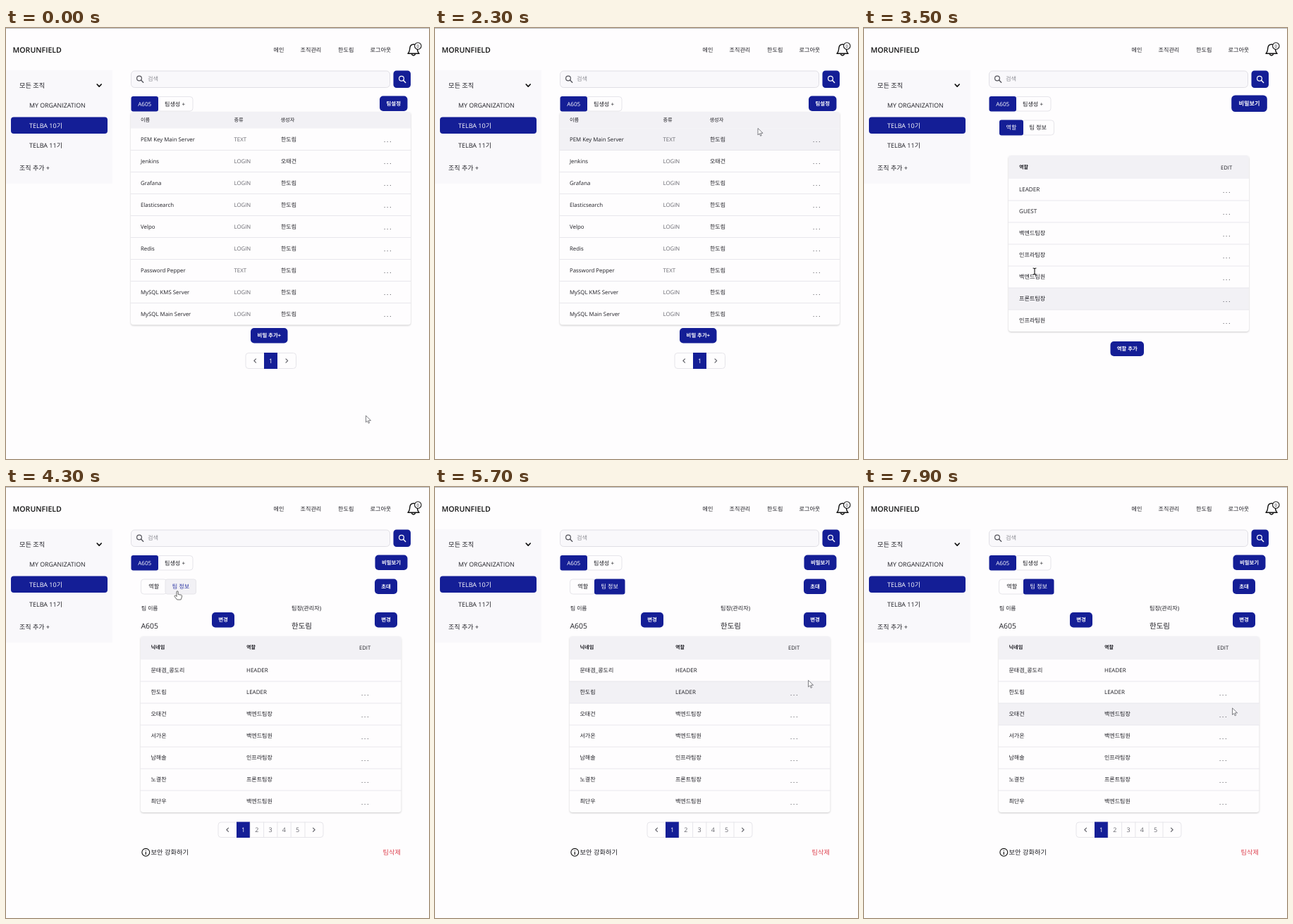
An HTML page for the animation above (8000 ms loop, 600 by 612 pixels).

```html
<!DOCTYPE html>
<html lang="ko">
<head>
<meta charset="utf-8">
<title>Team vault</title>
<style>
  html, body { margin: 0; width: 100%; height: 100%; overflow: hidden; background: #fefdfe; }
  svg { display: block; width: 100vw; height: 100vh; }
  text {
    font-family: "Open Sans", "Noto Sans CJK KR", "Noto Sans CJK", sans-serif;
    text-rendering: geometricPrecision;
    white-space: pre;
  }
  .card { filter: drop-shadow(0 1px 1.2px rgba(0, 0, 0, .2)); }
</style>
</head>
<body>
<svg id="stage" viewBox="0 0 600 612" xmlns="http://www.w3.org/2000/svg"></svg>
<script>
const BLUE = '#141e96', INK = '#1e1e24', GRAY = '#66666d', SOFT = '#f2f1f5', LINE = '#e6e5ea', PAGE = '#fefdfe';
const OWNER = '한도림';

// Text is placed by its left (or middle) x and its vertical centre.
function label(x, cy, str, size = 8, { fill = INK, weight = 500, mid = false, gap = 0 } = {}) {
  return `<text x="${x}" y="${cy + size * .36}" font-size="${size}" font-weight="${weight}" fill="${fill}"` +
    `${mid ? ' text-anchor="middle"' : ''}${gap ? ` letter-spacing="${gap}"` : ''}>${str}</text>`;
}

function box(x1, y1, x2, y2, fill, r = 0, stroke = 'none') {
  return `<rect x="${x1}" y="${y1}" width="${x2 - x1}" height="${y2 - y1}" rx="${r}" fill="${fill}" stroke="${stroke}"/>`;
}

function path(d, stroke = INK, width = 1.2, fill = 'none') {
  return `<path d="${d}" fill="${fill}" stroke="${stroke}" stroke-width="${width}" stroke-linecap="round" stroke-linejoin="round"/>`;
}

function ring(x, y, r, color, width, fill = 'none') {
  return `<circle cx="${x}" cy="${y}" r="${r}" fill="${fill}" stroke="${color}" stroke-width="${width}"/>`;
}

function button(x1, y1, x2, y2, str, id = '') {
  return `<g id="${id}">${box(x1, y1, x2, y2, BLUE, 5)}` +
    label((x1 + x2) / 2, (y1 + y2) / 2, str, 7.4, { fill: '#fff', weight: 700, mid: true }) + '</g>';
}

function lens(x, y, color) {
  return ring(x, y, 3.4, color, 1.2) + path(`M${x + 2.5} ${y + 2.5}l3.2 3.2`, color, 1.4);
}

function tab(x1, y1, x2, y2, str, on, id = '') {
  const back = on ? box(x1, y1, x2, y2, BLUE, 3) : box(x1, y1 + .5, x2, y2 - .5, PAGE, 4, LINE);
  return `<g id="${id}">${back}` +
    label((x1 + x2) / 2, (y1 + y2) / 2, str, 8.1, { fill: on ? '#fff' : INK, mid: true }) + '</g>';
}

const dots = (x, cy) => label(x, cy + 1.3, '...', 8, { fill: '#55555c', weight: 600, gap: 1.9 });

function table({ x1, x2, top, first, count }, id, head, rows) {
  const mid = i => first + 31 * i + 15.5;
  let out = `<g class="card">${box(x1, top, x2, first + 31 * count, PAGE, 4)}</g>` +
    path(`M${x1} ${first}V${top + 4}q0 -4 4 -4H${x2 - 4}q4 0 4 4V${first}z`, 'none', 0, SOFT) +
    `<rect id="${id}" x="${x1}" width="${x2 - x1}" height="31" fill="${SOFT}"/>` + head;
  for (let i = 0; i < count; i++) {
    if (i) out += path(`M${x1} ${first + 31 * i}H${x2}`, LINE, .9);
    out += rows(i, mid(i));
  }
  return out;
}

function pager(x1, y1, x2, y2, cells) {
  const cy = (y1 + y2) / 2, step = 19.3, start = x1 + 26;
  let out = box(x1, y1, x2, y2, PAGE, 4, LINE) + box(start, y1 - .5, start + 19, y2 + .5, BLUE);
  for (let i = 0; i < cells; i++) {
    if (i) out += path(`M${start + step * i} ${y1}V${y2}`, LINE, 1);
    out += label(start + step * i + 9.5, cy, i + 1, 9, { fill: i ? GRAY : '#fff', mid: true });
  }
  if (cells > 1) out += path(`M${x2 - 26} ${y1}V${y2}`, LINE, 1);
  return out + path(`M${x1 + 14.5} ${cy - 2.6}l-2.6 2.6l2.6 2.6`, GRAY, 1.2) +
    path(`M${x2 - 14.5} ${cy - 2.6}l2.6 2.6l-2.6 2.6`, GRAY, 1.2);
}

function frame() {
  let out = box(0, 0, 600, 612, PAGE) + box(0, 0, 600, 1, '#b9b9bb') +
    label(9.5, 31, 'MORUNFIELD', 10.6, { weight: 600, fill: '#111' });
  [[379.5, '메인'], [417.5, '조직관리'], [471, OWNER], [516.5, '로그아웃']]
    .forEach(([x, s]) => out += label(x, 31, s, 8.1));
  out += path('M570 36.2c2.4-2 2.6-4.4 2.8-7.4c.3-3.4 2.4-5.6 5.2-5.6s5 2.2 5.3 5.6c.3 3 .4 5.4 2.8 7.4z', '#111', 1.4) +
    path('M575.6 37.5q2.4 3 4.8 0', '#111', 1.4) + ring(584.3, 25.5, 4.7, '#111', 1.1, PAGE) +
    label(584.3, 25.6, '0', 6, { mid: true });

  out += box(0, 60, 151, 221, '#f9f8fb') + label(19, 81.5, '모든 조직', 9.2) +
    path('M129.2 80l3 3.2l3-3.2', '#111', 1.7) +
    label(33, 110, 'MY ORGANIZATION', 8.86) + box(7, 126.5, 144, 150, BLUE, 4) +
    label(33, 138.5, 'TELBA 10기', 9, { fill: '#fff' }) +
    label(33, 166.5, 'TELBA 11기', 9) + label(19, 199, '조직 추가 +', 9);

  return out + box(177.5, 61, 544.5, 84.5, '#f9f8fb', 5, '#e0dfe5') + lens(189, 71.5, '#55555c') +
    label(201, 72.5, '검색', 8.2, { fill: '#8c8c94', weight: 400 }) +
    box(549.5, 60.5, 574, 85, BLUE, 4.5) + lens(561, 71.8, '#fff') +
    tab(214, 97, 265, 118.5, '팀생성 +', false) + tab(177.5, 97, 216, 118.5, 'A605', true);
}

const GRIDS = [
  { x1: 177, x2: 574, top: 119, first: 142.5, count: 9 },
  { x1: 205, x2: 546, top: 181, first: 214, count: 7 },
  { x1: 191, x2: 560.5, top: 212, first: 245, count: 7 }
];

function secrets() {
  const names = ['PEM Key Main Server', 'Jenkins', 'Grafana', 'Elasticsearch', 'Velpo', 'Redis',
    'Password Pepper', 'MySQL KMS Server', 'MySQL Main Server'];
  const head = [[191, '이름'], [323.5, '종류'], [389.5, '생성자']]
    .map(([x, s]) => label(x, 130.3, s, 7.2)).join('');
  return table(GRIDS[0], 'hover0', head, (i, y) =>
    label(191, y, names[i], 7.85) +
    label(323.5, y, i % 6 ? 'LOGIN' : 'TEXT', 7.8, { fill: GRAY, weight: 400 }) +
    label(390, y, i === 1 ? '오태건' : OWNER) + dots(536, y)) +
    button(530, 96.5, 569.5, 118, '팀설정', 'settings') +
    button(347, 426, 399.5, 447.5, '비밀 추가+') + pager(340, 461.5, 411.5, 483.5, 1);
}

function roles() {
  const names = ['LEADER', 'GUEST', '백엔드팀장', '인프라팀장', '백엔드팀원', '프론트팀장', '인프라팀원'];
  const head = label(220, 197.5, '역할', 7.1, { weight: 700 }) + label(506, 198, 'EDIT', 7.6);
  return tab(224, 130.5, 269.5, 152.5, '팀 정보', false) + tab(192, 130.5, 226, 152.5, '역할', true) +
    table(GRIDS[1], 'hover1', head, (i, y) => label(220, y, names[i], 8.1) + dots(509, y)) +
    button(349.5, 445, 397, 466, '역할 추가');
}

function members() {
  const list = [['문태겸_콩도리', 'HEADER'], [OWNER, 'LEADER'], ['오태건', '백엔드팀장'], ['서가온', '백엔드팀원'],
    ['남해솔', '인프라팀장'], ['노결찬', '프론트팀장'], ['최단우', '백엔드팀원']];
  const head = label(205.5, 227.5, '닉네임', 7.2, { weight: 700 }) + label(341, 227.5, '역할', 7.1, { weight: 700 }) +
    label(501, 228.5, 'EDIT', 7.6);
  return tab(191.5, 130.5, 228, 152.5, '역할', false) +
    `<g id="infoHover">${box(226, 131, 269.5, 152, SOFT, 3, LINE)}` +
    label(248, 141.5, '팀 정보', 8.1, { fill: '#2f38a4', mid: true }) + '</g>' +
    tab(226, 130.5, 269.5, 152.5, '팀 정보', true, 'infoOn') +
    button(523, 130.5, 555, 152, '초대') +
    label(192, 172, '팀 이름', 7.8) + label(191.5, 197, 'A605', 10.4) + button(292, 178, 324, 199.5, '변경') +
    label(405, 172, '팀장(관리자)', 8.1) + label(405, 197, OWNER, 10.5) + button(523, 178, 555, 199.5, '변경') +
    table(GRIDS[2], 'hover2', head, (i, y) =>
      label(205.5, y, list[i][0]) + label(341, y, list[i][1]) + (i ? dots(504, y) : '')) +
    pager(301, 476, 450, 497.5, 5) +
    ring(198.3, 518.8, 5.4, '#111', 1.1) + path('M198.3 518.3v3.3M198.3 516v.1', '#111', 1.2) +
    label(205.5, 519, '보안 강화하기', 9.25) + label(534.5, 519, '팀삭제', 9.2, { fill: '#df4452' });
}

const cursors =
  '<g id="cursor">' +
  `<g class="arrow">${path('M0 .3V9.4l2.2-2l1.5 3.4l1.5-.7l-1.5-3.3h3z', '#606066', .8, '#fff')}</g>` +
  `<g class="beam">${path('M-2 -4.5q2 0 2 1q0-1 2-1M0 -3.5V3.5M-2 4.5q2 0 2-1q0 1 2 1', '#111', 1.1)}</g>` +
  `<g class="hand">${path('M-1 7V1q0-1.2 1.1-1.2T1.2 1V4.5l4.3 .8q1.2 .3 1.1 1.5l-.7 3.2l-.9 2H-.3l-3.5-4.3q-.7-1 .2-1.5t2.6 .8z', '#444', .8, '#fff')}</g>` +
  '</g>';

const stage = document.getElementById('stage');
stage.innerHTML = frame() + `<g id="view0">${secrets()}</g><g id="view1">${roles()}</g><g id="view2">${members()}</g>` +
  button(523.5, 96.5, 569.5, 118, '비밀보기', 'vault') + cursors;

const el = id => document.getElementById(id);
const show = (node, on) => node.setAttribute('display', on ? 'inline' : 'none');

// Pointer track: time, x, y.
const track = [
  [0, 510.5, 550.5], [600, 510.5, 550.5], [900, 480, 526], [1200, 392, 372], [1300, 368, 384], [1400, 354, 404],
  [1700, 362, 385], [2000, 410, 250], [2200, 446, 162], [2300, 458, 142.5], [2600, 546, 107], [3300, 546, 107],
  [3400, 320, 384], [3500, 242, 345.5], [3700, 238, 270], [4000, 243, 148], [4300, 243, 148], [5200, 244, 148],
  [5400, 400, 215], [5600, 524, 277], [5700, 529.5, 274.5], [5900, 529, 290], [6200, 522.5, 314], [8000, 522.5, 314]
];

function pointer(t) {
  const i = Math.max(1, track.findIndex(p => p[0] >= t));
  const [a, b] = [track[i - 1], track[i]];
  const k = Math.max(0, (t - a[0]) / (b[0] - a[0]));
  return [a[1] + (b[1] - a[1]) * k, a[2] + (b[2] - a[2]) * k];
}

const ramp = (t, from, to) => Math.min(1, Math.max(0, (t - from) / (to - from)));

function grow(id, cx, cy, s) {
  el(id).setAttribute('transform', `translate(${cx} ${cy}) scale(${s}) translate(${-cx} ${-cy})`);
}

function draw(now) {
  const t = Math.floor(now % 8000 / 100) * 100;
  const view = t < 2800 ? 0 : t < 4200 ? 1 : 2;
  [0, 1, 2].forEach(v => show(el('view' + v), v === view));
  show(el('vault'), view > 0);
  show(el('infoHover'), t < 4500);
  show(el('infoOn'), t >= 4500);

  const scale = 1 + .1 * (ramp(t, 2400, 2600) - ramp(t, 3500, 3700));
  grow('settings', 549.75, 107.25, scale);
  grow('vault', 546.5, 107.25, scale);

  // Row highlight trails the pointer by one step.
  const [hx, hy] = pointer(Math.max(0, t - 100));
  const g = GRIDS[view], row = Math.floor((hy - g.first) / 31), bar = el('hover' + view);
  show(bar, row >= 0 && row < g.count && hx > g.x1 && hx < g.x2);
  bar.setAttribute('y', g.first + 31 * row);

  const [x, y] = pointer(t);
  const kind = t >= 3500 && t < 3600 ? 'beam' :
    (t >= 2600 && t < 3400) || (t >= 4000 && t <= 5200) ? 'hand' : 'arrow';
  el('cursor').setAttribute('transform', `translate(${x} ${y})`);
  ['arrow', 'beam', 'hand'].forEach(k => show(stage.querySelector('.' + k), k === kind));
}

const start = performance.now();
function tick() {
  draw(performance.now() - start);
  requestAnimationFrame(tick);
}
tick();
</script>
</body>
</html>
```
